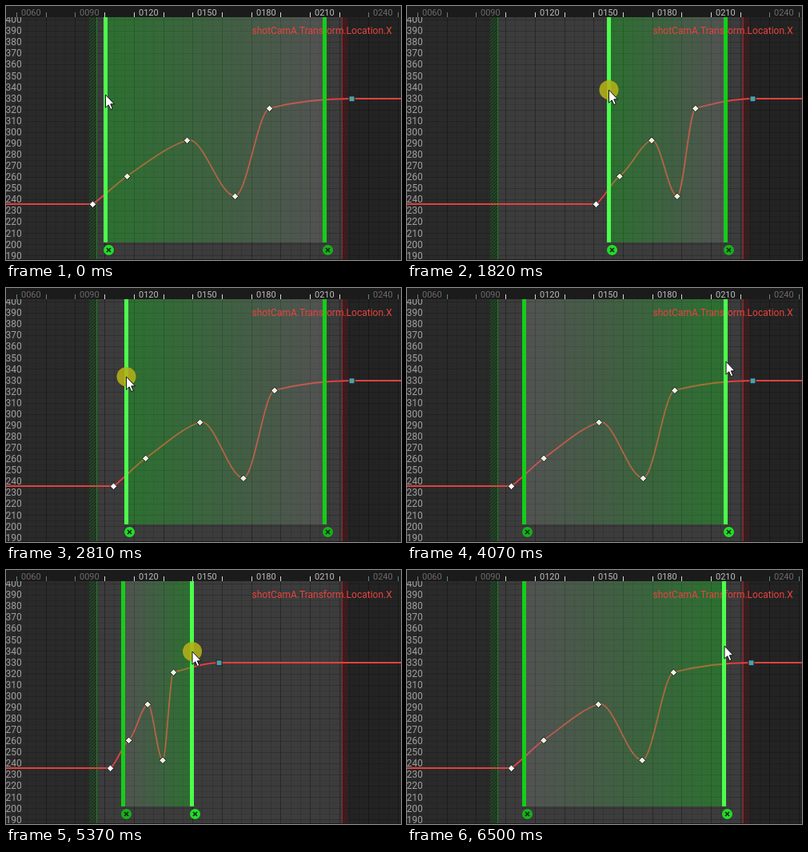
Animation, 494 px wide and 318 px high, one loop 6960 ms. Source, as an HTML page:

```html
<!DOCTYPE html>
<html lang="en">
<head>
<meta charset="utf-8">
<title>Curve retiming</title>
<style>
html, body { margin: 0; width: 100%; height: 100%; overflow: hidden; background: #2a2a2a; }
svg { display: block; width: 494px; height: 318px; }
text { font-family: Roboto, Arial, sans-serif; }
.crisp { shape-rendering: crispEdges; }
</style>
</head>
<body>
<svg id="stage" viewBox="0 0 494 318">
  <defs>
    <linearGradient id="fall">
      <stop id="fallA" offset="0"/>
      <stop id="fallB" offset="1"/>
    </linearGradient>
    <pattern id="hatchG" width="4" height="4" patternUnits="userSpaceOnUse">
      <path d="M-1 1L1 -1M0 4L4 0M3 5L5 3" stroke="#12591a" stroke-width="1.1"/>
    </pattern>
    <pattern id="hatchR" width="4" height="4" patternUnits="userSpaceOnUse">
      <path d="M-1 1L1 -1M0 4L4 0M3 5L5 3" stroke="#5c1519" stroke-width="1.1"/>
    </pattern>
  </defs>
  <g class="crisp">
    <rect width="494" height="318" fill="#2a2a2a"/>
    <rect x="113" width="307" height="318" fill="#3c3c3c"/>
    <rect x="420" width="74" height="318" fill="#232323"/>
  </g>
  <g id="grid" class="crisp" stroke="#000"></g>
  <g class="crisp">
    <rect x="104" y="14" width="9" height="304" fill="url(#hatchG)"/>
    <rect x="113" y="14" width="1" height="304" fill="#1f7a26"/>
    <rect x="421" y="14" width="7" height="304" fill="url(#hatchR)"/>
    <rect x="420" y="14" width="1" height="304" fill="#a01c20"/>
  </g>
  <g id="values" font-size="12" fill="#a0a0a0"></g>
  <path id="curve" fill="none" stroke="#e0423e" stroke-width="1.8"/>
  <rect id="span" class="crisp" y="14" height="282" fill="url(#fall)" fill-opacity=".3"/>
  <g id="keys" stroke="#1c1c1c"></g>
  <text x="307.5" y="35" font-size="12" fill="#e8443f">shotCamA.Transform.Location.X</text>
  <g id="handles"></g>
  <rect class="crisp" width="494" height="14" fill="#1b1b1b"/>
  <g id="ruler" font-size="11"></g>
  <rect class="crisp" y="317" width="494" height="1" fill="#1a1a1a"/>
  <circle id="press" r="12" fill="#b4b018" fill-opacity=".88"/>
  <path id="cursor" d="M0 0V16.2L3.7 12.8L6.3 18.6L8.8 17.5L6.3 11.8H11Z" fill="#fff" stroke="#111" stroke-width="1"/>
</svg>
<script>
const LOOP = 6960, L0 = 124, R0 = 398;
const $ = id => document.getElementById(id);

function set(el, attrs) {
  for (const name in attrs) el.setAttribute(name, attrs[name]);
  return el;
}
function add(parent, tag, attrs, text) {
  const el = set(document.createElementNS('http://www.w3.org/2000/svg', tag), attrs);
  if (text) el.textContent = text;
  return parent.appendChild(el);
}

// Grid, ruler and value axis
const STEP = 36.7, ROW = 14.07;
for (let i = 0; i < 41; i++) {
  const x = Math.round(13 + i * STEP / 3) + .5;
  add($('grid'), 'path', { d: `M${x} 14V318`, 'stroke-opacity': i % 3 ? .13 : .32 });
}
for (let i = 0; i < 44; i++) {
  const y = Math.round(17 + i * ROW / 2) + .5;
  add($('grid'), 'path', { d: `M0 ${y}H494`, 'stroke-opacity': i % 2 ? .09 : .2 });
}
for (let i = 0; i < 22; i++) {
  add($('values'), 'text', { x: -.5, y: 21.2 + i * ROW }, String(400 - i * 10));
}
for (let i = 0; i < 14; i++) {
  const x = Math.round(13 + i * STEP), lit = x > 113 && x < 420;
  add($('ruler'), 'rect', { class: 'crisp', x, y: 8, width: 1, height: 6, fill: lit ? '#d8d8d8' : '#5f8484' });
  if (i % 2 === 0) {
    add($('ruler'), 'text', { x: x + 6, y: 12, fill: lit ? '#bdbdbd' : '#6c6c6c' },
      String(60 + i * 15).padStart(4, '0'));
  }
}

// Keys: rest position and slope
const KEYS = [
  [108, 248, -.7], [151, 213, -.7], [226, 168, -.32],
  [286, 238, 0], [329, 128, -.25], [432, 116, 0]
];
const marks = KEYS.map((k, i) => add($('keys'), 'path', i < 5
  ? { d: 'M0 -4.3L4.3 0L0 4.3L-4.3 0Z', fill: i ? '#e9f4e0' : '#fff' }
  : { d: 'M-3.5 -3.5H3.5V3.5H-3.5Z', fill: '#4f9fac' }));

function makeHandle() {
  const g = add($('handles'), 'g', {});
  const bar = add(g, 'rect', { class: 'crisp', x: -2, y: 14, width: 5, height: 282 });
  const badge = add(g, 'circle', { cx: 4.5, cy: 305.5, r: 6.5 });
  add(g, 'path', { d: 'M2 303L7 308M7 303L2 308', stroke: '#0b2a0d', 'stroke-width': 1.7 });
  return { g, bar, badge };
}
const left = makeHandle(), right = makeHandle();

// Motion tables: [ms, value]
const LEFT = [[900, 124], [1120, 136], [1620, 202], [1820, 252], [1960, 266],
  [2310, 220], [2600, 168], [2810, 150], [3000, 146]];
const RIGHT = [[4310, 398], [4600, 375], [5010, 297], [5370, 232], [5450, 228],
  [5710, 285], [6050, 376], [6270, 396]];
const CUR_Y = [[720, 111], [1120, 113], [1820, 105], [2810, 111], [3070, 112], [3480, 93],
  [4070, 92], [5370, 102], [6270, 95]];

function slope(p, i) {
  if (i === 0 || i === p.length - 1) return 0;
  const a = (p[i][1] - p[i - 1][1]) / (p[i][0] - p[i - 1][0]);
  const b = (p[i + 1][1] - p[i][1]) / (p[i + 1][0] - p[i][0]);
  return a * b > 0 ? 2 * a * b / (a + b) : 0;
}
function track(p, t) {
  const end = p.length - 1;
  if (t <= p[0][0]) return p[0][1];
  if (t >= p[end][0]) return p[end][1];
  let i = 0;
  while (t > p[i + 1][0]) i++;
  const d = p[i + 1][0] - p[i][0], u = (t - p[i][0]) / d, v = 1 - u;
  return p[i][1] * v * v * (1 + 2 * u) + p[i + 1][1] * u * u * (3 - 2 * u)
    + d * u * v * (slope(p, i) * v - slope(p, i + 1) * u);
}

// Keys outside the span ride along with the nearer handle
function keyX(x, L, R) {
  if (x < L0) return L + x - L0;
  if (x > R0) return R + x - R0;
  const s = (R - L) / (R0 - L0);
  return L + (x - L0) * s - 2 * (1 - s);
}

function curvePath(xs) {
  let d = `M0 ${KEYS[0][1]}H${xs[0]}`;
  for (let i = 1; i < xs.length; i++) {
    const [, y0, m0] = KEYS[i - 1], [, y1, m1] = KEYS[i], w = (xs[i] - xs[i - 1]) / 3;
    d += `C${xs[i - 1] + w} ${y0 + m0 * w} ${xs[i] - w} ${y1 - m1 * w} ${xs[i]} ${y1}`;
  }
  return d + 'H494';
}

function paint(h, x, hover, active) {
  set(h.g, { transform: `translate(${x})` });
  set(h.bar, { fill: hover ? '#4dff4d' : '#12cf16' });
  set(h.badge, { fill: active ? '#22dd28' : '#17b01c' });
}

const within = (t, a, b) => t >= a && t < b;

function draw(t) {
  const L = Math.round(track(LEFT, t)), R = Math.round(track(RIGHT, t));
  const xs = KEYS.map(k => keyX(k[0], L, R) + .5);
  const onLeft = t < 3740;

  set($('curve'), { d: curvePath(xs) });
  marks.forEach((m, i) => set(m, { transform: `translate(${xs[i]} ${KEYS[i][1] + .3})` }));
  set($('span'), { x: L, width: R - L });
  set($('fallA'), { 'stop-color': onLeft ? '#0ae619' : '#858585' });
  set($('fallB'), { 'stop-color': onLeft ? '#858585' : '#0ae619' });
  paint(left, L, t < 3100, onLeft);
  paint(right, R, t >= 3450, !onLeft);

  const x = t < 3070 ? L + .5 : t > 3480 ? R + 1 : track([[3070, L + .5], [3480, R + 1]], t);
  const at = `translate(${x} ${track(CUR_Y, t)})`;
  const down = within(t, 720, 3070) || within(t, 3740, 4070) || within(t, 4330, 6500);
  set($('press'), { transform: at, visibility: down ? 'visible' : 'hidden' });
  set($('cursor'), { transform: at });
}

const start = performance.now();
function tick() {
  draw((performance.now() - start) % LOOP);
  requestAnimationFrame(tick);
}
tick();
</script>
</body>
</html>
```
